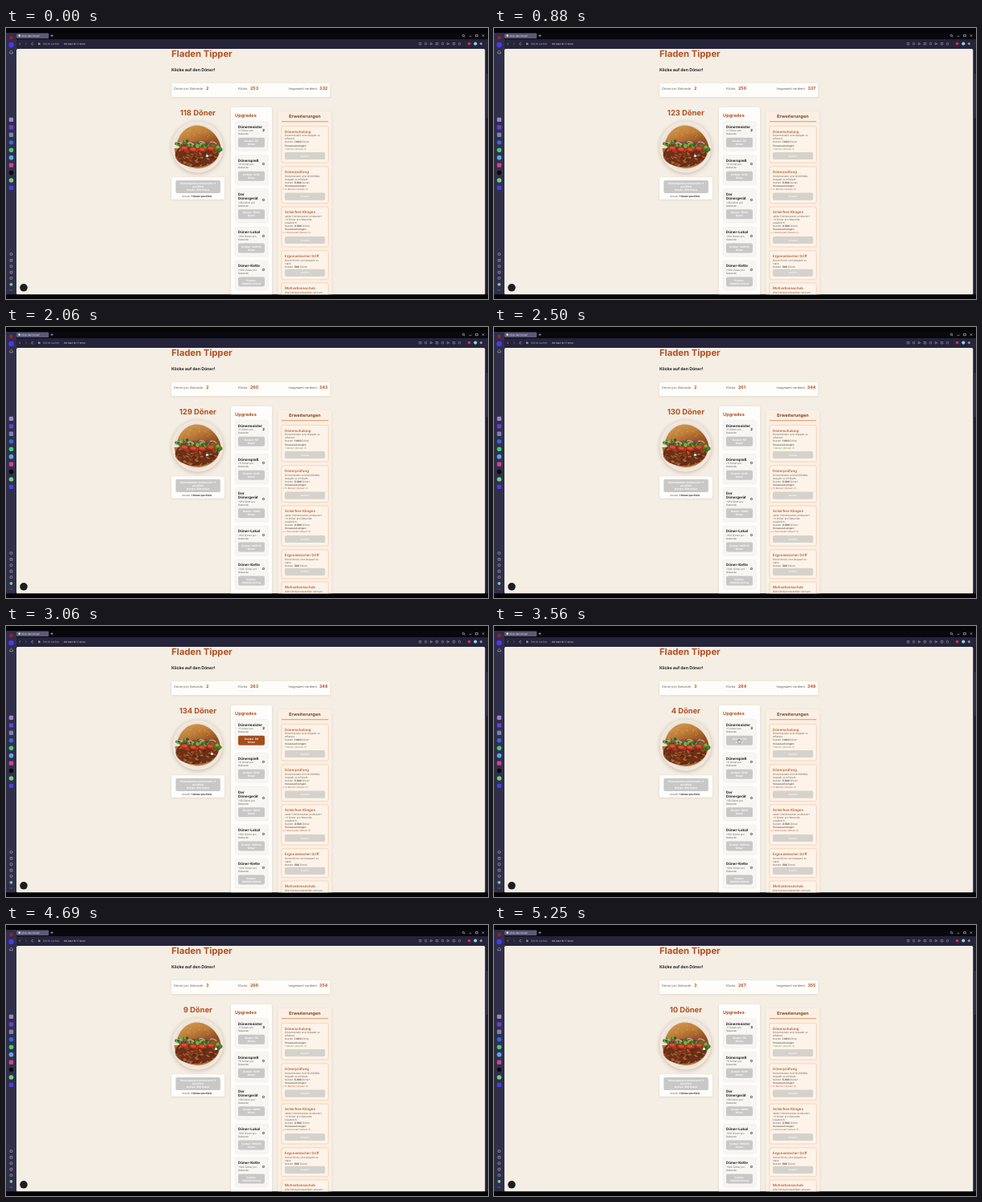
These frames come from a looping animation (600x338 px, 5.31 s). An HTML page with a canvas:

```html
<!DOCTYPE html>
<html lang="de">
<head>
<meta charset="utf-8">
<title>Fladen Tipper</title>
<style>
html, body { margin: 0; width: 100%; height: 100%; overflow: hidden; background: #050507; }
canvas { display: block; width: 600px; height: 338px; }
</style>
</head>
<body>
<canvas id="stage"></canvas>
<script>
const W = 600, H = 338, LOOP = 5310;
const PAGE = [13, 26, 583.3, 306.3];
const canvas = document.getElementById('stage');
const dpr = window.devicePixelRatio || 1;
canvas.width = W * dpr;
canvas.height = H * dpr;
const ctx = canvas.getContext('2d');

const FONT = 'Inter, "Liberation Sans", sans-serif';
const RUST = '#b34f20', INK = '#202020', GREY = '#66605a';

// Game events in ms
const CLICKS = [130, 400, 660, 1000, 1300, 1700, 2000, 2320, 2660, 2920, 3110, 4240, 4560, 4900];
const TICKS = [800, 1800, 2800, 4560];
const BUY = 3560, PRICE = 131, NEXT_PRICE = 151;

const passed = (list, t) => list.filter(e => e <= t).length;
const clamp = v => Math.max(0, Math.min(1, v));
const ease = v => { v = clamp(v); return v * v * (3 - 2 * v); };

function gameAt(t) {
  const clicks = passed(CLICKS, t);
  const bought = t >= BUY;
  const earned = TICKS.reduce((sum, e) => sum + (e <= t ? (e < BUY ? 2 : 3) : 0), clicks);
  return {
    clicks: 253 + clicks,
    total: 332 + earned,
    bank: 118 + earned - (bought ? PRICE : 0),
    rate: bought ? 3 : 2,
    price: bought ? NEXT_PRICE : PRICE
  };
}

function pressAt(t) {
  let p = 0;
  for (const c of CLICKS) p = Math.max(p, Math.min(ease((t - c + 120) / 60), 1 - ease((t - c) / 70)));
  return p;
}

function cursorAt(t) {
  const path = [[2960, 250, 158], [3060, 256, 158], [3150, 256, 158], [3440, 305, 143], [3640, 305, 143], [3950, 261, 153]];
  if (t <= path[0][0]) return path[0].slice(1);
  for (let i = 1; i < path.length; i++) {
    const [t0, x0, y0] = path[i - 1], [t1, x1, y1] = path[i];
    if (t < t1) {
      const k = ease((t - t0) / (t1 - t0));
      return [x0 + (x1 - x0) * k, y0 + (y1 - y0) * k];
    }
  }
  return path[path.length - 1].slice(1);
}

function rect(x, y, w, h, color) {
  ctx.fillStyle = color;
  ctx.fillRect(x, y, w, h);
}

function box(x, y, w, h, r, fill, stroke, shadow) {
  ctx.save();
  if (shadow) {
    ctx.shadowColor = 'rgba(90,50,20,' + shadow + ')';
    ctx.shadowBlur = 3 * dpr;
    ctx.shadowOffsetY = 0.7 * dpr;
  }
  ctx.beginPath();
  ctx.roundRect(x, y, w, h, r);
  ctx.fillStyle = fill;
  ctx.fill();
  ctx.restore();
  if (stroke) {
    ctx.strokeStyle = stroke;
    ctx.lineWidth = 0.5;
    ctx.stroke();
  }
}

function oval(x, y, rx, ry, angle, color) {
  ctx.beginPath();
  ctx.ellipse(x, y, rx, ry, angle, 0, 7);
  ctx.fillStyle = color;
  ctx.fill();
}

const disc = (x, y, r, color) => oval(x, y, r, r, 0, color);

function line(points, color, width = 0.7) {
  ctx.beginPath();
  points.forEach(([x, y]) => ctx.lineTo(x, y));
  ctx.strokeStyle = color;
  ctx.lineWidth = width;
  ctx.stroke();
}

// y is the vertical middle of the capitals
function text(s, x, y, size, color = INK, weight = 400, align = 'left') {
  ctx.font = weight + ' ' + size + 'px ' + FONT;
  ctx.textAlign = align;
  ctx.fillStyle = color;
  ctx.fillText(s, x, y + size * 0.36);
  return ctx.measureText(s).width;
}

function button(x, y, w, h, lines, fill = '#c9c8c7', color = '#ffffff', weight = 700) {
  box(x, y, w, h, 1.8, fill);
  lines.forEach((s, i) => {
    text(s, x + w / 2, y + h / 2 + (i - (lines.length - 1) / 2) * 4, 3.15, color, weight, 'center');
  });
}

function drawBrowser() {
  rect(0, 0, W, H, '#050507');
  rect(0, 6, W, 8, '#08080e');
  rect(0, 14, W, 12, '#25243a');
  rect(0, 6, 13, 326.3, '#302f4a');
  rect(596, 26, 4, 306.3, '#1f1e31');
  box(598, 57, 1.2, 55, 0.6, '#3d3c55');
  box(13, 6.5, 40.3, 6.5, 1.3, '#5b5a78');
  disc(16.6, 9.7, 1.4, '#ddd9e0');
  text('Klick den Döner!', 19.6, 9.7, 2.9, '#f0eff6');
  line([[55.4, 9.6], [58.8, 9.6]], '#c4c3d2', 0.6);
  line([[57.1, 7.9], [57.1, 11.3]], '#c4c3d2', 0.6);

  const pale = '#c9c8d8';
  ctx.lineWidth = 0.6;
  ctx.strokeStyle = pale;
  ctx.beginPath();
  ctx.arc(569.3, 9.3, 1.2, 0, 7);
  ctx.stroke();
  line([[570.2, 10.2], [571.3, 11.3]], pale);
  line([[576.7, 10.3], [579.4, 10.3]], pale, 0.6);
  ctx.strokeRect(584.7, 8.3, 2.5, 2.5);
  line([[592.7, 8.3], [595.2, 10.8]], pale, 0.6);
  line([[595.2, 8.3], [592.7, 10.8]], pale, 0.6);

  line([[17.9, 18.3], [16.6, 19.7], [17.9, 21.1]], pale, 0.5);
  line([[24.5, 18.3], [25.8, 19.7], [24.5, 21.1]], '#77768a', 0.5);
  ctx.strokeStyle = pale;
  ctx.beginPath();
  ctx.arc(33, 19.7, 1.3, 0.5, 5.6);
  ctx.stroke();
  disc(41.3, 19.7, 1.5, '#8a899d');
  text('Nicht sicher', 46, 19.7, 3.6, '#9b9aac');
  text('192.168.178.77:3000', 71.5, 19.7, 2.9, '#d3d2de');

  for (let i = 0; i < 8; i++) {
    const x = 515.5 + i * 7;
    ctx.strokeStyle = '#a09fb4';
    ctx.lineWidth = 0.6;
    ctx.beginPath();
    if (i % 3 === 1) ctx.arc(x, 19.7, 1.3, 0, 7);
    else if (i % 3 === 2) { ctx.moveTo(x - 1.3, 18.5); ctx.lineTo(x + 1.4, 19.7); ctx.lineTo(x - 1.3, 20.9); ctx.closePath(); }
    else ctx.rect(x - 1.3, 18.5, 2.6, 2.4);
    ctx.stroke();
  }
  disc(576.5, 19.6, 1.9, '#d12d4d');
  disc(584.3, 19.6, 2.1, '#8fd0e2');
  disc(591.3, 19.6, 1.6, '#8f8ea5');

  disc(6.5, 12, 2.2, '#a01a40');
  disc(6.5, 21, 3.3, '#4b36f0');
  line([[4.7, 30], [6.5, 28.3], [8.3, 30], [8.3, 31.8], [4.7, 31.8], [4.7, 30]], '#b5b4c6', 0.6);
  const apps = ['#9a86c4', '#6840d4', '#7e7fb4', '#2f6be0', '#45cc70', '#58a8e8', '#d2418e', '#0b0b10', '#6ccf7c', '#4a3fe0'];
  apps.forEach((c, i) => i < 3 || i === 6 || i === 9
    ? box(3.8, 111.7 + i * 9.45, 5.3, 5.3, 1, c)
    : disc(6.5, 114.4 + i * 9.45, 2.8, c));
  [282, 289.7, 297.2, 304.6, 312].forEach((y, i) => {
    ctx.beginPath();
    if (i % 2) ctx.rect(5.1, y - 1.3, 2.7, 2.7);
    else ctx.arc(6.4, y, 1.5, 0, 7);
    ctx.strokeStyle = '#b1b0c3';
    ctx.lineWidth = 0.65;
    ctx.stroke();
  });
  disc(6.4, 319.8, 1.9, '#7fc9a0');
  [5, 6.4, 7.8].forEach(x => disc(x, 327, 0.4, '#b1b0c3'));

  box(...PAGE, [1.5, 1.5, 1, 1], '#f4eee4');
}

function drawHead(g) {
  text('Fladen Tipper', 206, 32.2, 11.25, RUST, 700);
  text('Klicke auf den Döner!', 206, 52.2, 5.2, INK, 700);
  box(206, 69, 197.3, 17, 1.5, '#fffdfa', null, 0.12);
  text('Döner pro Sekunde:', 209, 75.4, 3.93, GREY);
  text(g.rate, 249, 75.2, 5.3, RUST, 700);
  text('Klicks:', 289, 75.4, 3.93, GREY);
  text(g.clicks, 304, 75.2, 5.3, RUST, 700);
  text('Aktive Klicks', 290, 81, 3.1, '#f1eae1');
  text('Insgesamt verdient:', 388, 75.4, 3.93, GREY, 400, 'right');
  text(g.total, 400.4, 75.2, 5.3, RUST, 700, 'right');
}

function drawKebab() {
  let seed = 11;
  const rnd = () => (seed = (seed * 16807) % 2147483647) / 2147483647;

  // upper bread
  const crust = ctx.createLinearGradient(228, 121, 240, 150);
  crust.addColorStop(0, '#d19a52');
  crust.addColorStop(0.45, '#c07d38');
  crust.addColorStop(1, '#8f4f20');
  ctx.beginPath();
  ctx.moveTo(213, 143);
  ctx.bezierCurveTo(216, 131, 226, 121, 238, 121.5);
  ctx.bezierCurveTo(253, 122, 266, 136, 267.5, 149);
  ctx.bezierCurveTo(252, 155, 228, 152, 213, 143);
  ctx.fillStyle = crust;
  ctx.fill();
  for (let i = 0; i < 26; i++) {
    oval(226 + rnd() * 27, 125 + rnd() * 11, 0.7, 0.4, rnd() * 3, i % 3 ? '#dcab68' : '#a4682c');
  }

  // lower bread and meat
  ctx.beginPath();
  ctx.moveTo(209.5, 150);
  ctx.bezierCurveTo(211, 166, 224, 175, 240, 175);
  ctx.bezierCurveTo(255, 174, 265, 165, 267.5, 150);
  ctx.closePath();
  ctx.fillStyle = '#b0713a';
  ctx.fill();
  ctx.save();
  ctx.beginPath();
  ctx.ellipse(237.5, 157.5, 27, 15.5, -0.05, 0, 7);
  ctx.clip();
  rect(209, 141, 60, 36, '#6b3017');
  const browns = ['#8d4622', '#a65a2c', '#54230f', '#b2683a'];
  for (let i = 0; i < 90; i++) {
    oval(211 + rnd() * 55, 149 + rnd() * 25, 2.4, 0.9, rnd() * 2 - 1, browns[i % 4]);
  }
  ctx.restore();

  // salad layers
  for (let i = 0; i < 34; i++) {
    const k = i / 33;
    disc(212 + 55 * k, 141 + 8 * k - 3 * Math.sin(k * 3.1) + rnd() * 6, 1.9 + rnd(), ['#4d7d2a', '#7fae42', '#375f22'][i % 3]);
  }
  for (let i = 0; i < 7; i++) {
    ctx.beginPath();
    ctx.ellipse(216 + i * 7, 144.5 + Math.sin(i), 4, 2, 0.3, 3, 6);
    ctx.strokeStyle = i % 2 ? '#8d3d68' : '#d6a6bd';
    ctx.lineWidth = 1.1;
    ctx.stroke();
  }
  for (let i = 0; i < 4; i++) {
    const x = 222 + i * 11, y = 150 + Math.sin(i) * 1.7;
    oval(x, y, 5.2, 3.1, 0.15, '#b8271f');
    oval(x, y - 0.4, 3.6, 1.8, 0.15, '#dc5038');
  }
}

function drawPlate(t, g) {
  text(g.bank + ' Döner', 238.8, 105.3, 9.375, RUST, 700, 'center');
  const s = 1 - 0.03 * pressAt(t), cx = 238.5, cy = 148.5;
  ctx.save();
  ctx.translate(cx, cy);
  ctx.scale(s, s);
  ctx.translate(-cx, -cy);
  ctx.save();
  ctx.shadowColor = 'rgba(120,60,20,.3)';
  ctx.shadowBlur = 5 * dpr;
  ctx.shadowOffsetY = dpr;
  disc(cx, cy, 32.3, '#eee3d5');
  ctx.restore();
  const china = ctx.createRadialGradient(cx, cy, 18, cx, cy, 31.5);
  china.addColorStop(0, '#d9cdbf');
  china.addColorStop(0.6, '#e8dfd4');
  china.addColorStop(1, '#f2ebe2');
  disc(cx, cy, 31.5, china);
  drawKebab();
  ctx.restore();

  box(206, 186.3, 66, 27.5, 1.8, '#fffdfa', null, 0.12);
  button(211.3, 190, 55.5, 16, ['Dönerdaumen verbessern +1', 'pro Klick', 'Kosten: 200 Döner']);
  const w = text('Aktuell: ', 219, 210.1, 3.1, GREY);
  text('1 Döner pro Klick', 219 + w, 210.1, 3.1, INK, 700);
}

function drawUpgrades(t, g) {
  box(280, 99, 51, 240, 1.8, '#fffdfb', null, 0.14);
  text('Upgrades', 285, 108.8, 5.65, RUST, 700);
  const items = [
    [116.5, ['Dönermeister'], 1, g.rate, g.price],
    [158.5, ['Dönerspieß'], 5, 0, 1000],
    [200.5, ['Der', 'Dönergerät'], 25, 0, 11000],
    [248.2, ['Döner-Lokal'], 150, 0, 120000],
    [290.2, ['Döner-Kette'], 500, 0, 1000000]
  ];
  items.forEach(([y, name, gain, count, price], i) => {
    const extra = (name.length - 1) * 5.6;
    box(285.5, y, 40.7, 36.4 + extra, 1.8, '#f8f6f3', '#eeeae5', 0.05);
    name.forEach((s, n) => text(s, 289, y + 6.5 + n * 5.6, 4.5, INK, 700));
    text('+' + gain + ' Döner pro', 289, y + 11.6 + extra, 3.1, GREY);
    text('Sekunde', 289, y + 15.5 + extra, 3.1, GREY);
    text(count, 322, y + 11 + extra * 0.55, 4.3, INK, 700, 'right');
    const ready = i === 0 && g.bank >= price;
    const label = price > 999999 ? ['Kosten:', price + ' Döner'] : ['Kosten: ' + price, 'Döner'];
    button(289, y + 20.2 + extra, 33, 12, label, ready ? '#a54d1f' : undefined);
  });
}

function drawExtras(g) {
  box(338.6, 104, 66.8, 235, 1.8, '#fbefe3', null, 0.12);
  text('Erweiterungen', 372, 110.4, 5.5, '#7d4527', 700, 'center');
  line([[343, 116.7], [401.3, 116.7]], '#c9713c', 0.7);

  const GREEN = '#6f9c55', RED = '#c4583a';
  const cards = [
    [122.4, 45.6, 'Dönerschulung', ['Dönermeister sind doppelt so', 'effizient.'], '1.000', '1 Meister', g.rate, GREEN],
    [172.8, 45.8, 'Dönerprüfung', ['Dönermeister sind NOCHMAL', 'doppelt so effizient.'], '5.000', '10 Meister', g.rate, RED],
    [223, 50, 'Schärfere Klingen', ['Jeder Dönermeister produziert', '+2 Döner pro Sekunde', 'zusätzlich.'], '2.500', '1 Dönerspieß', 0, RED],
    [277.8, 36, 'Ergonomischer Griff', ['Deine Klicks sind doppelt so', 'stark.'], '500'],
    [318, 40, 'Motivationsschub', ['Alle Dönerproduzenten sind um'], '']
  ];
  for (const [y, h, title, body, price, need, have, tone] of cards) {
    box(343, y, 58.3, h, 2, '#fdf3e9', '#efb68e');
    text(title, 347, y + 6.9, 4.4, '#bd5e2e', 600);
    body.forEach((s, i) => text(s, 347, y + 11.7 + i * 4.1, 3.15, GREY));
    if (!price) continue;
    let row = y + 11.7 + body.length * 4.1;
    const w = text('Kosten: ', 347, row, 3.15, GREY);
    const v = text(price, 347 + w, row, 3.15, '#3a3531', 600);
    text(' Döner', 347 + w + v, row, 3.15, GREY);
    if (need) {
      row += 4.1;
      text('Voraussetzungen:', 347, row, 3.1, GREY, 600);
      if (tone === RED) disc(345.2, row + 4.3, 0.5, tone);
      text(need + ' (Aktuell: ' + have + ')', 347, row + 4.3, 2.8, tone);
    }
    button(347, y + h - 13.1, 50.2, 9.2, ['Kaufen'], '#d5d2cc', '#faf7f2', 600);
  }
}

function drawCursor([x, y]) {
  ctx.save();
  ctx.translate(x, y);
  ctx.beginPath();
  ctx.moveTo(-0.7, -1.8);
  ctx.lineTo(0.3, -1.8);
  ctx.lineTo(0.4, 0);
  ctx.lineTo(2.3, 0.5);
  ctx.lineTo(2, 3);
  ctx.lineTo(-0.8, 3);
  ctx.lineTo(-2, 0.9);
  ctx.lineTo(-0.7, 1);
  ctx.closePath();
  ctx.fillStyle = '#fff';
  ctx.fill();
  ctx.strokeStyle = '#191919';
  ctx.lineWidth = 0.4;
  ctx.stroke();
  ctx.restore();
}

function draw(t) {
  const g = gameAt(t);
  ctx.setTransform(dpr, 0, 0, dpr, 0, 0);
  ctx.textRendering = 'geometricPrecision';
  drawBrowser();
  ctx.save();
  ctx.beginPath();
  ctx.rect(...PAGE);
  ctx.clip();
  drawHead(g);
  drawPlate(t, g);
  drawUpgrades(t, g);
  drawExtras(g);
  disc(22, 323.8, 4.8, '#1d1d1f');
  drawCursor(cursorAt(t));
  ctx.restore();
}

const start = performance.now();
function frame() {
  draw((performance.now() - start) % LOOP);
  requestAnimationFrame(frame);
}
frame();
</script>
</body>
</html>
```
